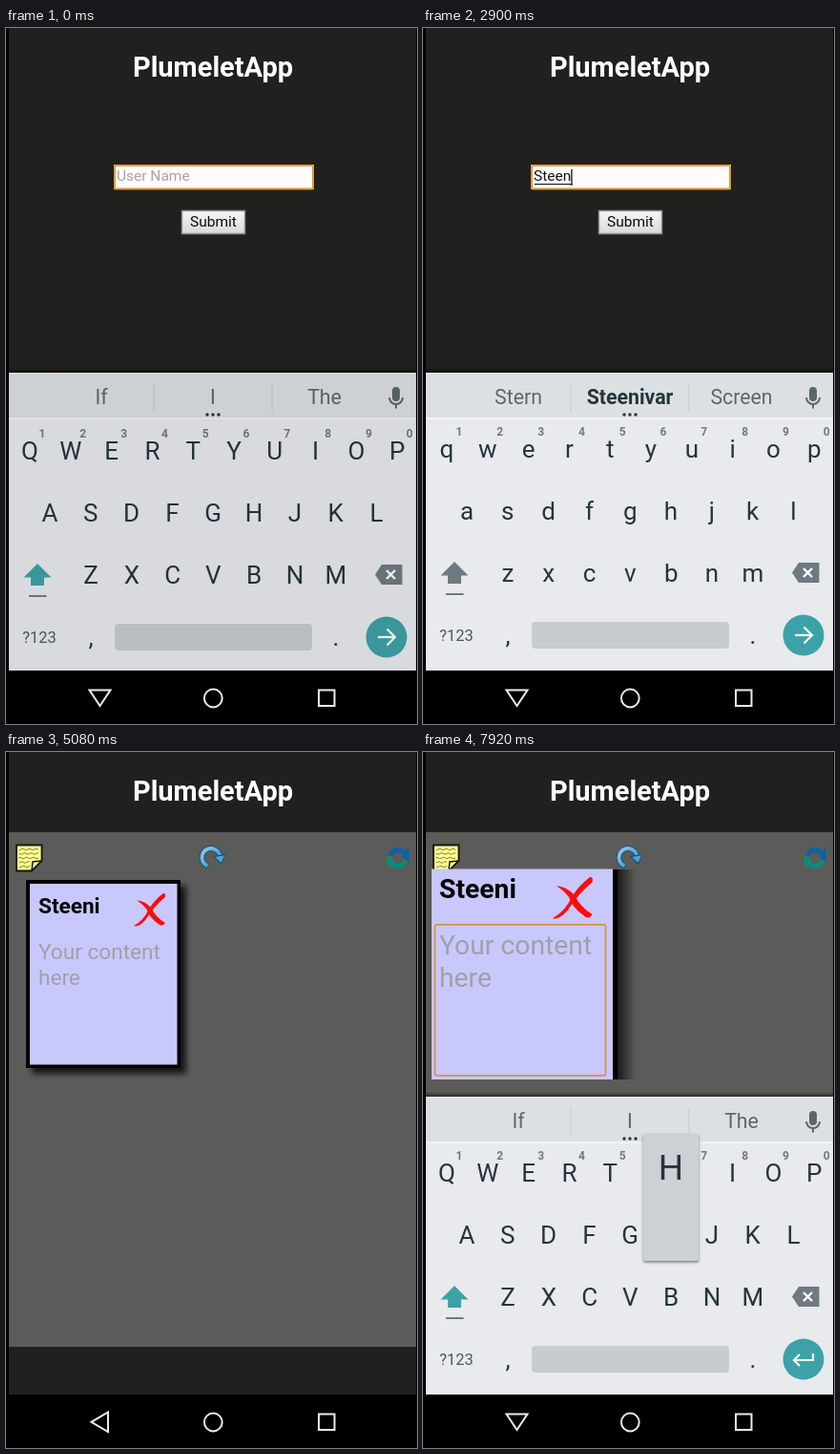
Recreate the animation shown at these times as an HTML page with a canvas. Size 431 by 729 pixels, loop 8 s.

```html
<!DOCTYPE html>
<html lang="en">
<head>
<meta charset="utf-8">
<title>Note wall</title>
<style>
html, body { margin: 0; width: 100%; height: 100%; overflow: hidden; background: #000; }
canvas { display: block; width: 431px; height: 729px; }
</style>
</head>
<body>
<canvas id="stage" width="431" height="729"></canvas>
<script>
const LOOP = 8000, STEP = 42.8;
const TITLE = 'PlumeletApp', NAME = 'Steeni', FULL = 'Steenivar';
const DARK = '#20201e', INK = '#26343c', TEAL = '#3da2a7', GREY = '#6f7a80';
const ROWS = [
  { keys: 'qwertyuiop', x: 25, y: 449.5 },
  { keys: 'asdfghjkl', x: 46, y: 515 },
  { keys: 'zxcvbnm', x: 89, y: 580 }
];
const g = document.getElementById('stage').getContext('2d');

// Each entry patches the state from its time onward.
const timeline = [
  [0, { page: 'login', typed: '', caret: false, focus: true, caps: true, keyboard: 'dim', nav: 'down',
        words: ['If', 'I', 'The'], bold: false, popup: '', enter: 'go', card: '' }],
  [120, { keyboard: 'on' }],
  [520, { caret: true }],
  [950, { caret: false }],
  [1100, { typed: 'S', caret: true, caps: false, popup: 's' }],
  [1240, { popup: '', words: ['So', 'S', 'She'] }],
  [1380, { popup: 't' }],
  [1510, { typed: 'St', popup: '' }],
  [1660, { words: ['St', FULL, 'Dr'] }],
  [1790, { popup: 'e' }],
  [1920, { typed: 'Ste', popup: '' }],
  [2060, { popup: 'e' }],
  [2180, { typed: 'Stee', popup: '', words: ['Steepest', FULL, 'Steering'] }],
  [2460, { caret: false }],
  [2620, { popup: 'n' }],
  [2770, { typed: 'Steen', popup: '', caret: true }],
  [2900, { words: ['Stern', FULL, 'Screen'], bold: true }],
  [3050, { popup: 'i' }],
  [3180, { typed: NAME, popup: '' }],
  [3330, { words: ['Stern', FULL, 'Steamy'] }],
  [3730, { caret: false }],
  [4100, { caret: true }],
  [4380, { caret: false, focus: false, caps: true, words: [] }],
  [4510, { nav: 'back' }],
  [4660, { page: 'blank', keyboard: 'fade' }],
  [4810, { page: 'wall', keyboard: '' }],
  [4950, { card: 'small' }],
  [7100, { keyboard: 'black', nav: 'down' }],
  [7230, { keyboard: 'dim', words: ['If', 'I', 'The'], bold: false, enter: 'return' }],
  [7350, { card: 'large' }],
  [7500, { keyboard: 'on', focus: true }],
  [7920, { popup: 'h' }]
];

function stateAt(t) {
  return timeline.reduce((s, [at, patch]) => at <= t ? Object.assign(s, patch) : s, {});
}

function rect(x, y, w, h, fill, r = 0) {
  g.fillStyle = fill;
  g.beginPath();
  g.roundRect(x, y, w, h, r);
  g.fill();
}

function frame(x, y, w, h, color, width, r = 0) {
  g.strokeStyle = color;
  g.lineWidth = width;
  g.beginPath();
  g.roundRect(x, y, w, h, r);
  g.stroke();
}

function path(points, close) {
  g.beginPath();
  points.forEach(([x, y]) => g.lineTo(x, y));
  if (close) g.closePath();
}

function poly(points, fill) {
  path(points, true);
  g.fillStyle = fill;
  g.fill();
}

function line(points, color, width, close) {
  path(points, close);
  g.strokeStyle = color;
  g.lineWidth = width;
  g.stroke();
}

function disc(x, y, r, fill) {
  g.fillStyle = fill;
  g.beginPath();
  g.arc(x, y, r, 0, 7);
  g.fill();
}

function arc(x, y, r, from, to, color, width) {
  g.strokeStyle = color;
  g.lineWidth = width;
  g.beginPath();
  g.arc(x, y, r, from, to);
  g.stroke();
}

function text(str, x, y, size, color, align = 'center', weight = 400) {
  g.font = `${weight} ${size}px Roboto, sans-serif`;
  g.textAlign = align;
  g.fillStyle = color;
  g.fillText(str, x, y);
}

function fade(x0, y0, x1, y1, ...colors) {
  const f = g.createLinearGradient(x0, y0, x1, y1);
  colors.forEach((c, i) => f.addColorStop(i / (colors.length - 1), c));
  return f;
}

function dots(x, y, r, gap, color) {
  for (let i = -1; i < 2; i++) disc(x + i * gap, y, r, color);
}

function login(s) {
  rect(113, 143, 210, 26, '#fffcfb', 1);
  frame(114, 144, 208, 24.5, s.focus ? '#e09a3c' : '#b5b3b0', 2, 1);
  if (s.typed) {
    text(s.typed, 116, 160, 15.5, '#141414', 'left');
    const w = g.measureText(s.typed).width;
    if (s.focus) rect(117, 163, w, 1.3, '#222');
    if (s.caret) rect(116 + w, 148, 1.3, 17, '#111');
  } else {
    text('User Name', 116, 160, 15.5, '#a7a3a4', 'left');
    if (s.caret) rect(116, 148, 1.3, 17, '#111');
  }
  rect(184, 191, 67, 25, fade(0, 191, 0, 216, '#f6f6f6', '#d9d9d9'));
  frame(184.5, 191.5, 66, 24, '#929292', 1.4);
  text('Submit', 217.5, 208, 15.5, '#0c0c0c');
}

function noteIcon() {
  path([[11, 97.5], [37.5, 97.5], [37.5, 114], [27, 124.5], [11, 124.5]], true);
  g.fillStyle = '#fdfb8e';
  g.fill();
  g.strokeStyle = '#16160e';
  g.lineWidth = 1.8;
  g.stroke();
  line([[37.5, 114], [28, 115], [27, 124.5]], '#16160e', 1.5);
  for (let y = 102; y < 121; y += 4.5) {
    g.beginPath();
    g.moveTo(14, y + 0.5);
    const end = y < 114 ? 34 : 25;
    for (let x = 14; x <= end; x++) g.lineTo(x, y + Math.sin(x * 0.9 + y) * 0.7);
    g.strokeStyle = '#8a8540';
    g.lineWidth = 1;
    g.stroke();
  }
}

function redoIcon() {
  const x = 215, y = 110.5;
  arc(x, y, 9.5, 1.9, 6.1, '#164a77', 5.5);
  arc(x, y, 9.5, 1.95, 6.1, fade(205, 100, 225, 120, '#8fd0f2', '#2f8ac6'), 3.8);
  poly([[217, 109], [230, 107], [226, 118]], '#164a77');
  poly([[219, 110], [229, 108.3], [225.6, 116]], '#4aa3d8');
}

function syncIcon() {
  arc(411, 111, 8.5, 3.5, 6.1, '#0d61a8', 5);
  arc(411, 111, 8.5, 0.35, 2.95, '#0b8d78', 5);
  poly([[415, 110], [422, 99], [423, 115]], '#0d61a8');
  poly([[407, 112], [399, 108], [400, 122]], '#0b8d78');
}

function cross(x, y, k) {
  g.save();
  g.translate(x, y);
  g.scale(k, k);
  g.fillStyle = '#fb0d0d';
  g.beginPath();
  g.moveTo(30, 0);
  g.quadraticCurveTo(33, 0, 32, 4);
  g.quadraticCurveTo(20, 14, 12, 27);
  g.quadraticCurveTo(5, 35, 0, 33);
  g.quadraticCurveTo(10, 28, 16, 15);
  g.quadraticCurveTo(22, 6, 30, 0);
  g.fill();
  g.beginPath();
  g.moveTo(3, 7);
  g.quadraticCurveTo(12, 8, 18, 15);
  g.quadraticCurveTo(22, 24, 32, 30);
  g.quadraticCurveTo(29, 35, 25, 31);
  g.quadraticCurveTo(16, 25, 13, 16);
  g.quadraticCurveTo(9, 11, 3, 7);
  g.fill();
  g.restore();
}

function cardText(x, y, size, gap, lead) {
  text(NAME, x, y, size, '#050508', 'left', 700);
  text('Your content', x, y + gap, size, '#a0a0a9', 'left');
  text('here', x, y + gap + lead, size, '#a0a0a9', 'left');
}

function smallCard() {
  g.save();
  g.shadowColor = 'rgba(0,0,0,.75)';
  g.shadowBlur = 6;
  g.shadowOffsetX = g.shadowOffsetY = 6;
  rect(21, 134, 162, 197, '#000');
  g.restore();
  rect(25, 138, 154.5, 189.5, '#c8c8fd');
  cardText(34, 168.5, 22.6, 48, 27.2);
  cross(134, 148, 1.03);
}

function largeCard(focus) {
  rect(204, 123, 19, 220, fade(204, 0, 223, 0, '#1b1b1a', '#3a3a39', '#5b5b59'));
  rect(198, 123, 6, 220, '#020202');
  rect(9, 122.5, 190, 220.5, '#c8c8fd');
  cardText(17, 153, 28.3, 59, 34);
  cross(136, 131, 1.3);
  if (focus) frame(12.5, 180.8, 179, 158, '#d9933d', 1.7, 2);
}

function wall(s) {
  rect(3, 84, 427, 539, '#5b5b59');
  noteIcon();
  redoIcon();
  syncIcon();
  if (s.card === 'small') smallCard();
  if (s.card === 'large') largeCard(s.focus);
}

function mic(x, y) {
  rect(x - 4, y - 10.5, 8, 15, '#5b676d', 4);
  arc(x, y + 0.5, 7, 0, Math.PI, '#5b676d', 2);
  rect(x - 1, y + 7, 2, 5, '#5b676d');
}

function suggestions(s) {
  rect(3, 361, 427, 48, '#dde0e3');
  rect(3, 361, 427, 1.5, '#e6e8ea');
  rect(3, 408, 427, 2, '#f0f1f3');
  [155, 279].forEach(x => rect(x - 0.5, 373, 1, 29, '#c3c7ca'));
  s.words.forEach((word, i) => {
    const bold = s.bold && i === 1;
    text(word, 100 + i * 117, 394, 21.3, bold ? INK : '#5c686e', 'center', bold ? 700 : 400);
  });
  if (s.words.length) dots(217, 405, 1.7, 6, INK);
  mic(409, 386.5);
}

function shiftKey(color) {
  poly([[33, 559], [47.5, 573.5], [40, 573.5], [40, 582], [26, 582], [26, 573.5], [18.5, 573.5]], color);
  rect(24, 592, 18.5, 2, GREY);
}

function backspace() {
  poly([[387, 570.5], [394, 560], [415.5, 560], [415.5, 581], [394, 581]], GREY);
  line([[399, 566], [408, 575]], '#fff', 2.4);
  line([[408, 566], [399, 575]], '#fff', 2.4);
}

function enterKey(kind) {
  disc(399, 636, 21.5, TEAL);
  if (kind === 'go') {
    line([[390, 636], [407, 636]], '#fff', 2.2);
    line([[399.5, 627.5], [408, 636], [399.5, 644.5]], '#fff', 2.2);
  } else {
    line([[409, 630], [409, 637], [390, 637]], '#fff', 2.2);
    line([[395, 631], [389, 637], [395, 643]], '#fff', 2.2);
  }
}

function keyLabel(k, caps) {
  return caps ? k.toUpperCase() : k;
}

function keys(s) {
  ROWS.forEach((row, r) => [...row.keys].forEach((k, i) => {
    const x = row.x + i * STEP;
    text(keyLabel(k, s.caps), x, row.y, 26, INK);
    if (!r) text((i + 1) % 10, x + 13, 427, 12, GREY, 'center', 700);
  }));
  shiftKey(s.caps ? TEAL : GREY);
  backspace();
  text('?123', 35, 642, 16.5, '#4c585e');
  text(',', 89, 645, 26, INK);
  text('.', 346, 645, 26, INK);
  rect(114, 622, 207, 28, '#c8cbcf', 4);
  enterKey(s.enter);
}

function popup(k, caps) {
  const r = ROWS.findIndex(row => row.keys.includes(k));
  const x = ROWS[r].x + ROWS[r].keys.indexOf(k) * STEP;
  const y = [331, 400, 465][r];
  g.save();
  g.shadowColor = 'rgba(0,0,0,.5)';
  g.shadowBlur = 3;
  g.shadowOffsetY = 1.5;
  rect(x - 29, y, 58, r ? 133 : 136, '#cdd1d5', 2);
  g.restore();
  text(keyLabel(k, caps), x, y + 47.5, 37, INK);
  if (!r) dots(x + 19, y + 64, 1.4, 6, '#8b9499');
}

function keyboard(s) {
  if (s.keyboard === 'black') {
    rect(3, 360.5, 427, 313, '#000');
    return;
  }
  rect(3, 356, 427, 5, fade(0, 356, 0, 361, 'rgba(0,0,0,0)', 'rgba(0,0,0,.55)'));
  rect(3, 361, 427, 312, '#e8eaed');
  suggestions(s);
  g.save();
  if (s.keyboard !== 'on') g.translate(0, 2);
  keys(s);
  g.restore();
  if (s.keyboard === 'dim') rect(3, 361, 427, 312, 'rgba(0,0,0,.066)');
  if (s.keyboard === 'fade') rect(3, 361, 427, 312, 'rgba(234,235,238,.15)');
  if (s.popup) popup(s.popup, s.caps || s.popup === 's');
}

function navBar(kind) {
  rect(0, 673, 431, 56, '#000');
  const arrow = kind === 'down'
    ? [[87.5, 693.5], [109.5, 693.5], [98.5, 710]]
    : [[107, 691.5], [107, 712], [89.5, 701.8]];
  line(arrow, '#ececec', 2, true);
  arc(217.3, 702, 9.4, 0, 7, '#ececec', 2);
  frame(328, 693.5, 16.5, 16.5, '#ececec', 2);
}

function draw(s) {
  rect(0, 0, 431, 729, '#000');
  rect(3, 0, 427, 673, DARK);
  text(TITLE, 217, 51, 29, '#fff', 'center', 700);
  if (s.page === 'login') login(s);
  if (s.page === 'wall') wall(s);
  if (s.keyboard) keyboard(s);
  navBar(s.nav);
}

const start = performance.now();
function tick() {
  draw(stateAt((performance.now() - start) % LOOP));
  requestAnimationFrame(tick);
}
tick();
</script>
</body>
</html>
```
